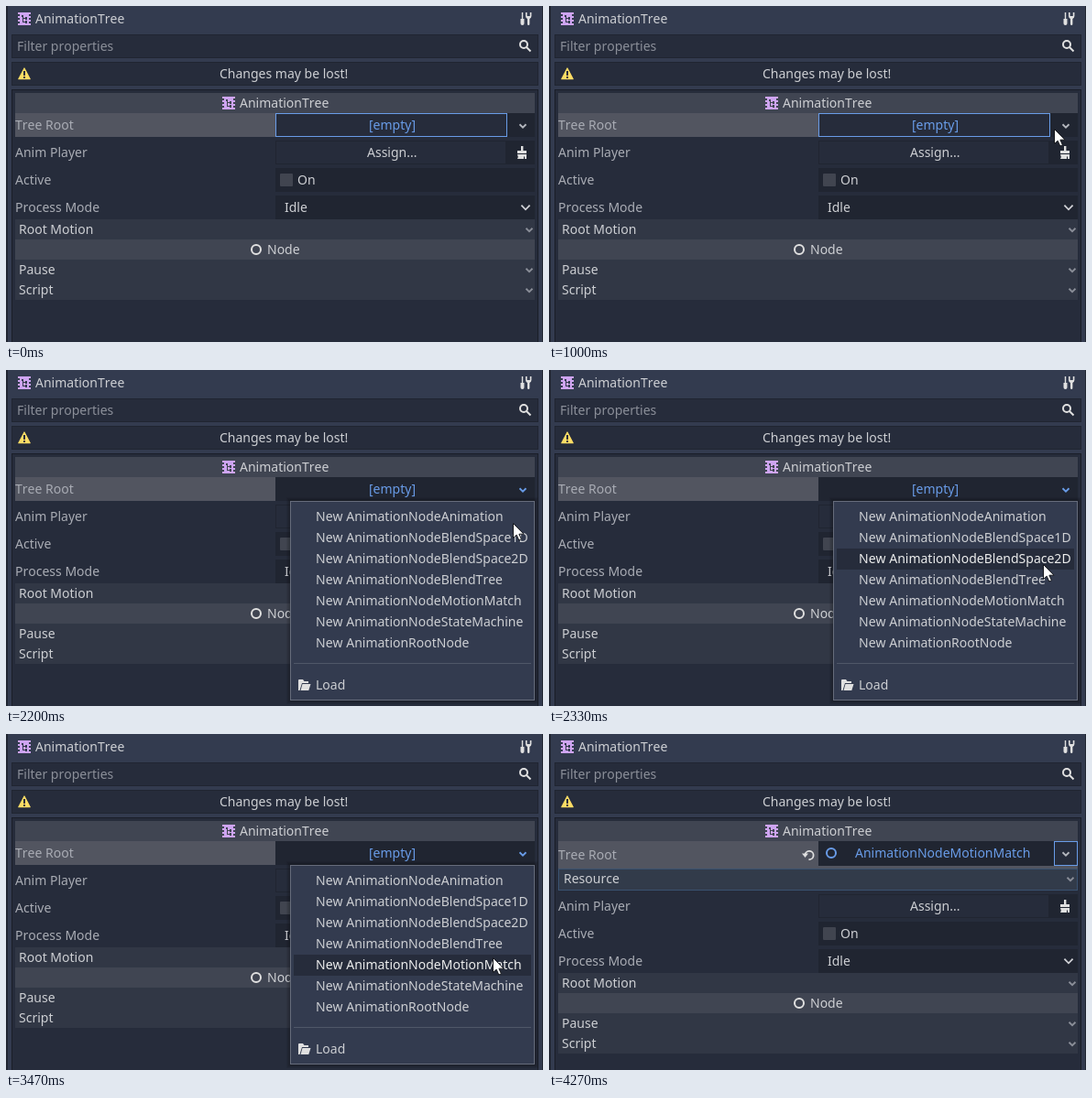
Recreate the animation shown at these times as an HTML page. Size 586 by 367 pixels, loop 5470 ms.

```html
<!DOCTYPE html>
<html lang="en">
<head>
<meta charset="utf-8">
<title>Inspector</title>
<style>
html, body { margin: 0; width: 100%; height: 100%; overflow: hidden; background: #333b4f; }
svg { display: block; width: 586px; height: 367px; }
p { margin: 0; font: 14px/19px "Noto Sans", "Open Sans", sans-serif; font-kerning: none; color: #cdcfd3; white-space: pre; }
.dim { color: #a9acb4; }
.hint { color: #8b8f99; }
.accent { color: #699ce8; }
.line { fill: none; stroke: #e0e0e0; stroke-width: 2; }
</style>
</head>
<body>
<svg id="stage" viewBox="0 0 586 367" xmlns="http://www.w3.org/2000/svg"></svg>
<script>
const BASE = '#333b4f', DARK = '#262c3b', DEEP = '#202531', EDGE = '#1a1e28';
const CATEGORY = '#404552', SECTION = '#313745', SELECTED = '#525560', ACCENT = '#699ce8';
const LOOP = 5470, TICKS = 82;
const ITEMS = ['Animation', 'BlendSpace1D', 'BlendSpace2D', 'BlendTree', 'MotionMatch', 'StateMachine']
  .map(s => 'New AnimationNode' + s).concat('New AnimationRootNode');

const rect = (x, y, w, h, fill, more = '') =>
  `<rect x="${x}" y="${y}" width="${w}" height="${h}" fill="${fill}" ${more}/>`;
const box = (x, y, w, h, fill, stroke) =>
  rect(x + .5, y + .5, w - 1, h - 1, fill, `stroke="${stroke}"`);
// HTML text, so that glyphs sit on whole pixels; y is the middle of the line
const text = (x, y, s, cls = '') =>
  `<foreignObject x="${x}" y="${y - 10}" width="260" height="20"><p class="${cls}">${s}</p></foreignObject>`;
const path = (d, more = 'class="line"') => `<path d="${d}" ${more}/>`;
const at = (x, y, s) => `<g transform="translate(${x} ${y})">${s}</g>`;
const group = (id, s) => `<g id="${id}">${s}</g>`;
const chevron = (x, y, r, color, id = '') =>
  path(`M${x - r} ${y - r / 2}l${r} ${r}l${r} ${-r}`,
    `fill="none" stroke="${color}" stroke-width="1.8" ${id && `id="${id}"`}`);
const ring = (x, y, color) =>
  `<circle cx="${x}" cy="${y}" r="5" fill="none" stroke="${color}" stroke-width="2"/>`;

function treeIcon(x, y, back) {
  let s = rect(0, 0, 14, 14, '#cea4f1');
  for (const hy of [2, 6, 10]) s += rect(0, hy, 2, 2, back) + rect(12, hy, 2, 2, back);
  s += rect(4, 3, 2, 2, back) + rect(5, 4, 1, 7, back) + rect(5, 6, 4, 1, back) +
       rect(8, 5, 2, 3, back) + rect(5, 10, 4, 1, back) + rect(8, 9, 2, 3, back);
  return at(x, y, s);
}

const toolsIcon = at(561, 7,
  path('M2.5 0v7', 'stroke="#e0e0e0" stroke-width="1.4"') +
  path('M.5 7h4v5q0 2-2 2t-2-2z', 'fill="#e0e0e0"') +
  path('M6 0v4q0 2 2 3v5.5q0 1.5 1.2 1.5t1.2-1.5v-5.5q2-1 2-3v-4h-1.6v4h-3.2v-4z', 'fill="#e0e0e0"'));

const brushIcon = at(557, 153,
  path('M5 0h2.4v5h3.6v3h-10v-3h4zM1 9h10v5h-2v-2.5h-1v2.5h-7q1.5-2 0-5z', 'fill="#e0e0e0"'));

const warnIcon = at(13, 67,
  path('M7 1L13.2 12.7H.8Z', 'fill="#ffdd65" stroke="#ffdd65" stroke-width="1.2" stroke-linejoin="round"') +
  rect(6, 4, 2, 5, DARK) + rect(6, 10, 2, 2, DARK));

const folderIcon = at(318, 337,
  path('M1 13V2q0-1 1-1h4l1.5 2h4.500v2H5L2.500 13zM5.500 6h9l-2.200 7H3.500z', 'fill="#e0e0e0"'));

const section = (y, name) =>
  rect(10, y, 567, 22, SECTION) + text(14, y + 11, name) + chevron(571, y + 11.5, 3.5, '#8a8e98');

const frame =
  rect(0, 0, 586, 367, BASE) + rect(0, 0, 2, 367, DEEP) + rect(585, 0, 1, 367, DEEP) +
  treeIcon(13, 7, BASE) + text(32, 14, 'AnimationTree') + toolsIcon +
  box(6, 31, 575, 26, DARK, DEEP) + text(12, 44, 'Filter properties', 'hint') +
  `<circle cx="565" cy="42" r="4" class="line"/>` + path('M568 45l4.5 4.5') +
  box(6, 61, 575, 26, DARK, DEEP) + warnIcon + text(233, 74, 'Changes may be lost!') +
  box(6, 91, 575, 280, DARK, EDGE) +
  rect(10, 95, 567, 22, CATEGORY) + treeIcon(236, 99, CATEGORY) + text(255, 106, 'AnimationTree');

const before =
  rect(10, 117, 284, 26, SELECTED) + text(10, 130, 'Tree Root', 'dim') +
  rect(294, 117, 283, 26, DEEP) +
  group('focus', box(294, 117, 253, 26, DARK, ACCENT)) +
  text(396, 130, '[empty]', 'accent') + chevron(564, 131, 3.5, '#b4b7be', 'drop');

const after =
  rect(10, 117, 567, 30, SELECTED) + text(10, 132, 'Tree Root', 'dim') +
  path('M279.5 131.5a4.6 4.6 0 1 1 4 5.5', 'class="line" style="stroke-width:1.8"') +
  path('M276 130.5h7l-3.5 4.5z', 'fill="#e0e0e0"') +
  rect(294, 117, 257, 27, DEEP) + ring(308, 130, ACCENT) +
  text(334, 130, 'AnimationNodeMotionMatch', 'accent') +
  box(551, 117, 26, 27, DARK, ACCENT) + chevron(564, 131, 3.5, '#b4b7be') +
  box(10, 147, 567, 24, '#323b4a', '#3a5270') + text(16, 158, 'Resource') +
  chevron(569, 158.5, 3.5, '#8a8e98');

const rest =
  text(10, 160, 'Anim Player', 'dim') + rect(294, 147, 283, 26, DEEP) +
  box(294, 147, 252, 26, DARK, DEEP) + text(394, 160, 'Assign...') + brushIcon +
  text(10, 190, 'Active', 'dim') + rect(294, 177, 283, 26, DEEP) +
  rect(299, 183, 14, 14, '#414550', 'rx="1"') + text(318, 190, 'On') +
  text(10, 220, 'Process Mode', 'dim') + rect(294, 207, 283, 26, DEEP) +
  text(304, 220, 'Idle') + chevron(567, 220, 4.6, '#d0d2d6') +
  section(233, 'Root Motion') +
  rect(10, 255, 567, 22, CATEGORY) + ring(273, 266, '#e0e0e0') + text(285, 266, 'Node') +
  section(277, 'Pause') + section(299, 'Script');

// Soft shadow: stacked translucent borders around the menu
const shadow = [1, 2, 3, 4].map(d =>
  rect(310 - d, 143 - d, 267 + 2 * d, 218 + 2 * d, '#000', 'opacity=".07"')).join('');

const menu = shadow +
  box(310, 143, 267, 218, BASE, '#666c7b') +
  group('hover', rect(314, 149, 259, 23, DARK)) +
  ITEMS.map((s, i) => text(338, 160 + 23 * i, s)).join('') +
  rect(314, 320, 259, 1, '#4f5768') + folderIcon + text(338, 344, 'Load');

const arrow = path('M.5 .5V16.5L4.2 13.2L6.8 19L9.4 17.8L6.9 12.2H12Z',
  'fill="#fff" stroke="#15171c" stroke-width="1" stroke-linejoin="round"');

document.getElementById('stage').innerHTML =
  frame + group('before', before) + group('after', after) + group('rest', rest) +
  group('menu', menu) + group('cursor', arrow);

// Pointer path: tick, x, y, easing into this point
const linear = u => u, easeOut = u => u * (2 - u), easeIn = u => u * u;
const smooth = u => u * u * (3 - 2 * u);
const PATH = [
  [1, 575, 350], [5, 524, 132, easeOut], [6, 524, 132], [7, 523, 134],
  [11, 523, 134], [15, 551, 134, smooth], [17, 551, 134], [20, 559, 131, easeOut],
  [29, 559, 131], [30, 561, 128], [33, 553, 167, easeIn], [38, 531, 238, easeOut],
  [39, 531, 241], [40, 531, 241], [41, 531, 244], [53, 531, 244],
  [60, 241, 291, smooth], [63, 110, 350]
];
const OPEN = 26, HOVER = 34, PICK = 53, GONE = 64;

function pointer(n) {
  const i = PATH.findIndex(p => p[0] >= n);
  if (i <= 0) return PATH[0].slice(1, 3);
  const [a, ax, ay] = PATH[i - 1], [b, bx, by, ease = linear] = PATH[i];
  const u = ease((n - a) / (b - a));
  return [Math.round(ax + (bx - ax) * u), Math.round(ay + (by - ay) * u)];
}

// Fifteen ticks a second, each rounded to 10 ms
const tickTime = n => Math.round(n * 100 / 15) * 10;
function tickAt(t) {
  let n = Math.floor(t * 15 / 1000);
  if (t >= tickTime(n + 1)) n++;
  if (t < tickTime(n)) n--;
  return Math.min(n, TICKS - 1);
}

const el = id => document.getElementById(id);
const show = (id, on) => { el(id).style.display = on ? '' : 'none'; };
const move = (id, x, y) => el(id).setAttribute('transform', `translate(${x} ${y})`);

function draw(n) {
  const open = n >= OPEN && n < PICK, picked = n >= PICK;
  const [x, y] = pointer(n);
  const row = Math.floor((y - 149) / 23);
  show('before', !picked);
  show('after', picked);
  show('focus', n < OPEN);
  show('menu', open);
  show('hover', open && n >= HOVER);
  show('cursor', n >= 1 && n < GONE);
  el('drop').setAttribute('stroke', open ? ACCENT : '#b4b7be');
  move('rest', 0, picked ? 28 : 0);
  move('hover', 0, row * 23);
  move('cursor', x, y);
  el('menu').querySelectorAll('p').forEach((p, i) => {
    p.style.color = n >= HOVER && i === row ? '#eceded' : '';
  });
}

const start = performance.now();
let last = -1;
function loop() {
  const n = tickAt((performance.now() - start) % LOOP);
  if (n !== last) draw(last = n);
  requestAnimationFrame(loop);
}
loop();
</script>
</body>
</html>
```
